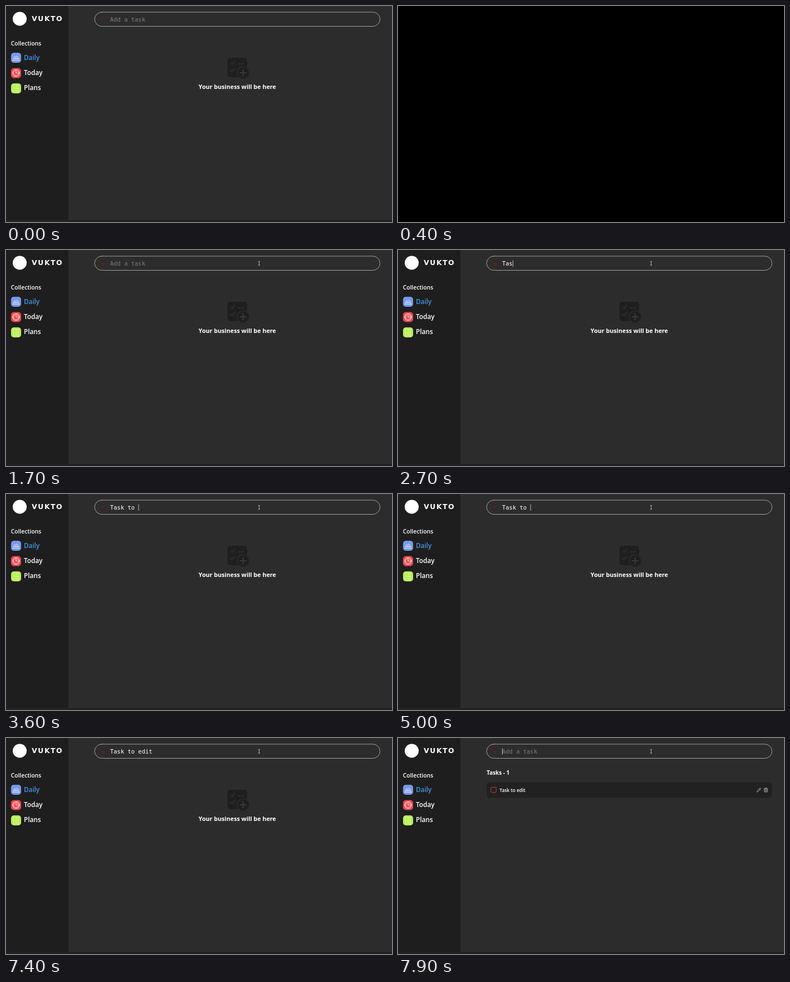
Write an HTML page that moves like this. It is 690 by 388 pixels and loops after 8000 ms.

```html
<!DOCTYPE html>
<html lang="en">
<head>
<meta charset="utf-8">
<title>Task list</title>
<style>
  html, body { margin: 0; width: 100%; height: 100%; overflow: hidden; background: #000; }
  svg { display: block; width: 690px; height: 388px; }
  text { font-family: "Open Sans", "Noto Sans", sans-serif; font-weight: 600; fill: #fff; }
  .brand { font: 700 12.3px "DejaVu Sans", sans-serif; letter-spacing: 1.6px; }
  .nav { font-size: 11.7px; }
  .mono { font: 400 10.46px "DejaVu Sans Mono", monospace; }
  .line { fill: none; stroke: #fff; stroke-linecap: round; stroke-linejoin: round; }
  [hidden] { display: none; }
</style>
</head>
<body>
<svg viewBox="0 0 690 388">
  <rect width="690" height="388" fill="#000"/>
  <g id="app">
    <rect width="690" height="388" fill="#2c2c2c"/>
    <rect width="111.5" height="388" fill="#1e1e1e"/>
    <rect y="384" width="690" height="4" fill="#222"/>

    <circle cx="24.5" cy="23" r="12.5" fill="#fff"/>
    <text class="brand" x="46" y="27.3">VUKTO</text>

    <text x="8.7" y="70.7" font-size="10.3">Collections</text>
    <g transform="translate(9 84)">
      <rect width="18" height="18" rx="5" fill="#7898ea"/>
      <path class="line" stroke-width=".8" stroke-opacity=".85" d="M3 13.5h12M4 13V9.5l2.5-3 2 2 1.5-2.5 4 3.5V13M7 13v-2.5h4V13M5 10h8"/>
    </g>
    <text class="nav" x="32" y="96.8" style="fill:#3f97e6">Daily</text>
    <g transform="translate(9 111.5)">
      <rect width="18" height="18" rx="5" fill="#e8474d"/>
      <circle class="line" cx="9" cy="9" r="6.2" stroke-width=".9"/>
      <circle class="line" cx="9" cy="9" r="4.4" stroke-width=".7"/>
      <path class="line" stroke-width=".9" d="M9 6v3h2.5"/>
    </g>
    <text class="nav" x="32" y="123.9">Today</text>
    <g transform="translate(9 139)">
      <rect width="18" height="18" rx="5" fill="#b9ee5b"/>
      <path class="line" stroke-width="1" stroke-opacity=".75" d="M4.5 4.5h1.5M4.5 9h1.5M4.5 13.5h1.5M8.5 4.5h5M8.5 9h5M8.5 13.5h5"/>
    </g>
    <text class="nav" x="32" y="151.2">Plans</text>

    <rect class="line" x="158.5" y="11" width="510" height="25.5" rx="12.75" style="stroke:#a2a2a2"/>
    <g class="line" style="stroke:#54272a">
      <circle id="ring" cx="172.5" cy="24" r="9"/>
      <path d="M168.5 24h8M172.5 20v8"/>
    </g>
    <text id="hint" class="mono" x="186" y="28" style="fill:#7d7d7d">Add a task</text>
    <text id="entry" class="mono" x="186" y="28"></text>
    <rect id="caret" y="18.5" width=".8" height="11.5" fill="#ddd"/>

    <g id="empty">
      <rect x="396" y="93" width="35" height="35" rx="5" fill="#1f1f1f"/>
      <path class="line" style="stroke:#2c2c2c" stroke-width="2" d="M401 102l3 3 5-6M401 115l3 3 5-6M415 104h10M415 114h3"/>
      <circle cx="424" cy="120" r="11" fill="#1f1f1f" stroke="#2c2c2c" stroke-width="1.5"/>
      <path class="line" style="stroke:#3a3a3a" stroke-width="1.8" d="M418.5 120h11M424 114.5v11"/>
      <text x="413.5" y="149.4" font-size="10.7" text-anchor="middle" style="font-weight:700">Your business will be here</text>
    </g>

    <g id="list">
      <text x="158.5" y="65.6" font-size="9.9" style="font-weight:700">Tasks - 1</text>
      <rect x="158.5" y="79.5" width="510" height="28" rx="4.5" fill="#212121"/>
      <rect class="line" x="166" y="88.5" width="9.6" height="9.6" rx="2.4" style="stroke:#cf3f49"/>
      <text x="181.6" y="96.5" font-size="8.4">Task to edit</text>
      <g class="line" style="stroke:#bdbdbd" stroke-width=".8">
        <path d="M641.8 96.8l.6-2.3 4.2-4.2q.7-.6 1.4 0t0 1.5l-4.1 4.2zM645.6 91.3l1.5 1.5"/>
        <path d="M654 91.2h7.2M656.3 91v-1.2h2.6V91M654.8 91.4l.4 5.6h4.8l.4-5.6M656.6 92.8v2.8M658.6 92.8v2.8"/>
      </g>
    </g>

    <g id="pointer">
      <path id="arrow" d="M0 0v6l1.4-1.2.9 2 .9-.4-.9-2h1.8z" fill="#fff" stroke="#111" stroke-width=".4"/>
      <path id="beam" class="line" style="stroke:#c8c8c8" stroke-width=".8" d="M-1.3-3.2h2.6M0-3.2v6.4M-1.3 3.2h2.6"/>
    </g>
  </g>
</svg>
<script>
  const LOOP = 8000, PITCH = 6.3, TEXT = "Task to edit";
  const $ = id => document.getElementById(id);
  const show = (id, on) => $(id).toggleAttribute("hidden", !on);
  const within = (t, from, to) => t >= from && t < to;

  // Key presses in ms: positive adds a letter, negative is a backspace.
  const keys = [2200, 2600, 2700, 2900, 3200, 3400, 3500, 3600, 3900, 4000, 4200, 4400,
    -4600, -4700, -4900, -5000, 5200, 5400, -5800, -5900, 6200, 6400, 6700, 6900];
  const SUBMIT = 7900;

  // Pointer positions, one per 100 ms.
  const MOVE = 500;
  const path = [[600, 155], [567, 146], [505, 135], [436, 120],
    [408, 85], [410, 50], [436, 30], [452.5, 24]];

  function typed(t) {
    if (t >= SUBMIT) return 0;
    return keys.reduce((n, k) => t >= Math.abs(k) ? n + Math.sign(k) : n, 0);
  }

  function draw(t) {
    const n = typed(t), done = t >= SUBMIT;
    show("app", !within(t, 400, 500));
    show("ring", t >= MOVE);
    show("hint", n === 0);
    $("entry").textContent = TEXT.slice(0, n);
    $("caret").setAttribute("x", 186.2 + n * PITCH);
    show("caret", within(t, 1200, 1700) || within(t, 2200, 7400) || done);
    show("empty", !done);
    show("list", done);

    const step = Math.max(0, Math.min(path.length - 1, Math.floor((t - MOVE) / 100)));
    const [x, y] = path[step], overInput = y < 37;
    $("pointer").setAttribute("transform", `translate(${x} ${y})`);
    show("pointer", t >= MOVE);
    show("arrow", !overInput);
    show("beam", overInput);
  }

  const start = performance.now();
  function tick() {
    draw((performance.now() - start) % LOOP);
    requestAnimationFrame(tick);
  }
  tick();
</script>
</body>
</html>
```
